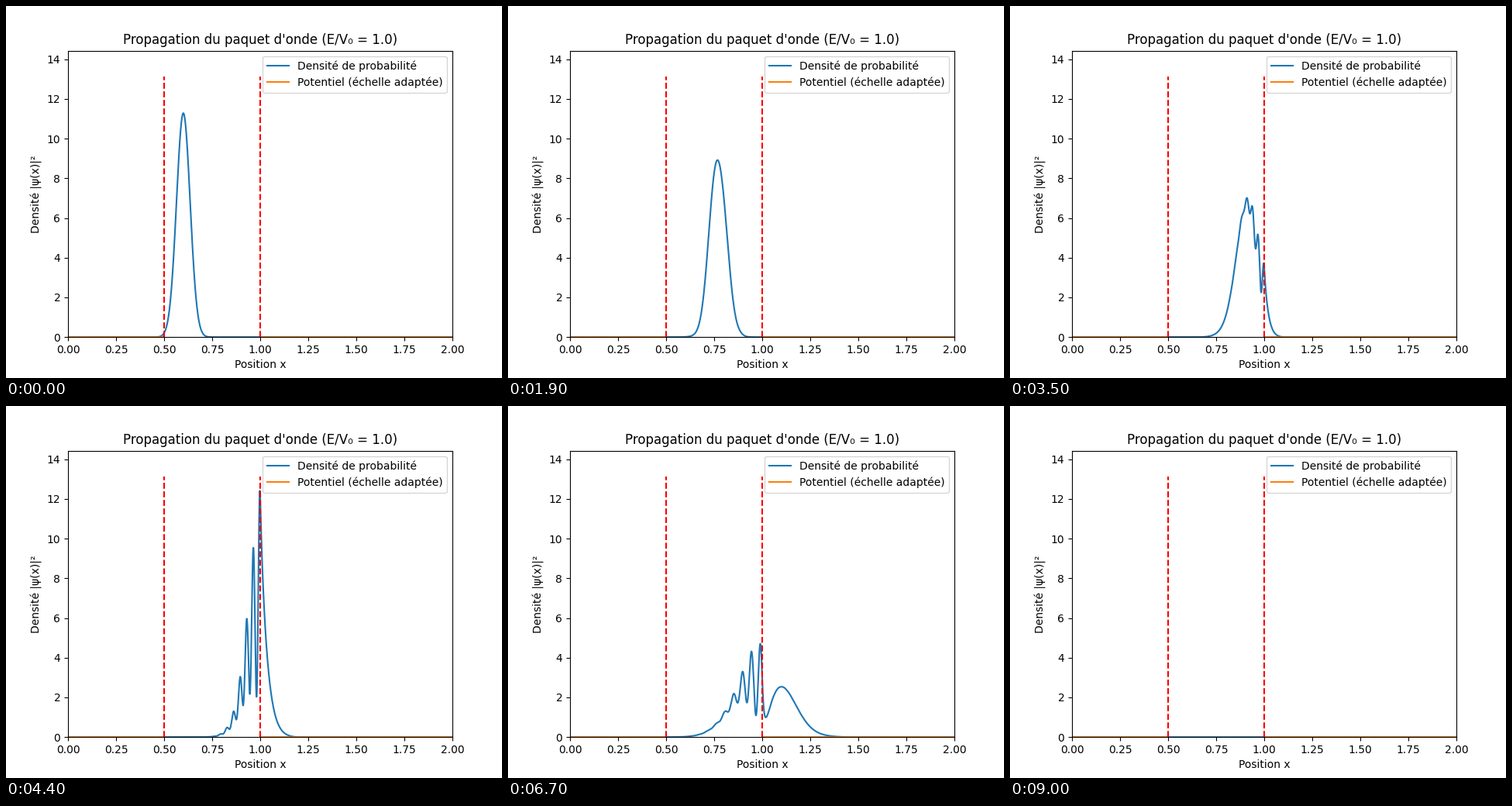
These frames come from a looping animation (640 by 480 pixels, 9100 ms). A matplotlib script:

```python
import numpy as np
import matplotlib.pyplot as plt
from matplotlib.animation import FuncAnimation

# Grid and time step
DX, DT = 0.001, 1e-7
NX = 2000
FRAMES = 91
STEPS = 1000          # half steps per frame

# Wave packet and potential well
XC, SIGMA = 0.6, 0.05
V0, RATIO = -4000, 1.0
LEFT, RIGHT = 0.5, 1.0

x = np.linspace(0, (NX - 1) * DX, NX)
potential = np.where((x >= LEFT) & (x <= RIGHT), V0, 0.0)


def propagate():
    """Leapfrog solution of the Schrodinger equation; the last row stays empty."""
    s = DT / DX**2
    diag = 2 * (s + potential[1:-1] * DT)
    k = np.sqrt(2 * abs(RATIO * V0))
    amp = 1 / np.sqrt(SIGMA * np.sqrt(np.pi))
    psi = amp * np.exp(1j * k * x - (x - XC)**2 / (2 * SIGMA**2))
    re, im = psi.real.copy(), psi.imag.copy()

    def kick(f):
        return s * (f[2:] + f[:-2]) - diag * f[1:-1]

    density = np.zeros((FRAMES, NX))
    for n in range(FRAMES - 1):
        for j in range(STEPS // 2):
            if j == 0:
                old = im[1:-1].copy()
            im[1:-1] += kick(re)
            if j == 0:
                density[n, 1:-1] = re[1:-1]**2 + im[1:-1] * old
            re[1:-1] -= kick(im)
    return density


density = propagate()
top = density.max()

fig, ax = plt.subplots(figsize=(6.4, 4.8), dpi=100)
wave, = ax.plot(x, density[0], label="Densité de probabilité")
ax.plot(x, potential / abs(V0) * top, label="Potentiel (échelle adaptée)")
for edge in (LEFT, RIGHT):
    ax.plot([edge, edge], [0, top], color="red", linestyle="--")
ax.set_xlim(0, 2)
ax.set_ylim(0, 1.1 * top)
ax.set_title(f"Propagation du paquet d'onde (E/V₀ = {RATIO})")
ax.set_xlabel("Position x")
ax.set_ylabel("Densité |ψ(x)|²")
ax.legend(loc="upper right")


def update(n):
    wave.set_ydata(density[n])
    return wave,


anim = FuncAnimation(fig, update, frames=FRAMES, interval=100,
                     repeat=True, repeat_delay=0)
plt.show()
```
